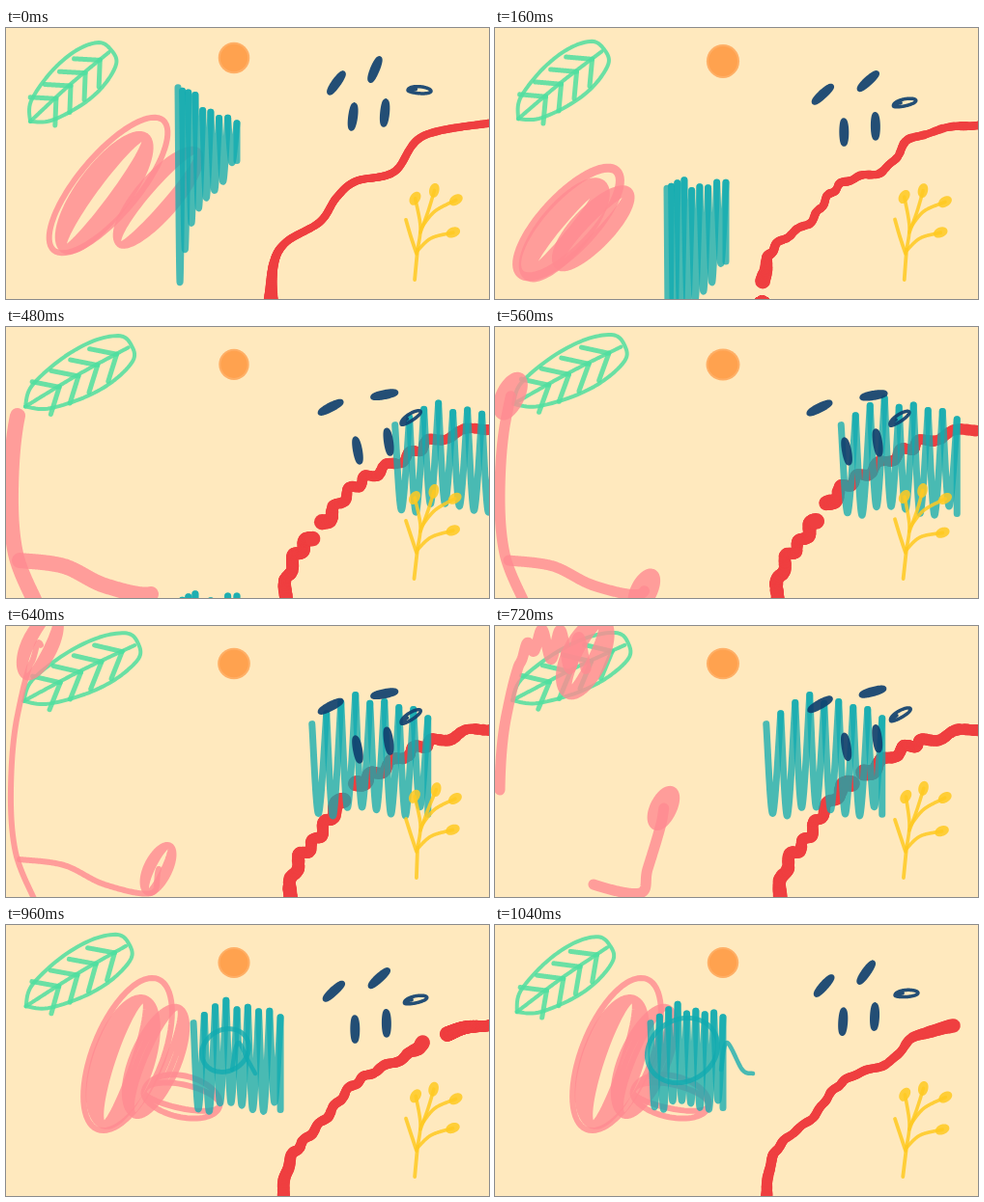
An HTML page with a canvas for the animation above (1.12 s loop, 500 by 281 pixels).

```html
<!DOCTYPE html>
<html lang="en">
<head>
<meta charset="utf-8">
<title>Drifting crayon marks</title>
<style>
  html, body { margin: 0; width: 100%; height: 100%; overflow: hidden; background: #ffe9be; }
  canvas { display: block; width: 100vw; height: 100vh; filter: blur(.5px); }
</style>
</head>
<body>
<canvas id="stage" width="500" height="281"></canvas>
<script>
const ctx = document.getElementById('stage').getContext('2d');
const STEP = 80, STEPS = 14;

const mix = (a, b, t) => a + (b - a) * t;
const clamp = (v, lo = 0, hi = 1) => Math.max(lo, Math.min(hi, v));
const wave = t => Math.sin(Math.PI * t);
const noise = n => {
  const v = Math.sin(n * 12.9898 + 4.1) * 43758.5453;
  return (v - Math.floor(v)) * 2 - 1;
};

function pen(color, alpha) {
  ctx.strokeStyle = ctx.fillStyle = color;
  ctx.globalAlpha = alpha;
}

// Smooth path through the points; the parameter counts points.
function spline(...xy) {
  const last = xy.length / 2 - 1;
  return s => {
    const i = clamp(Math.floor(s), 0, last - 1), t = s - i;
    return [0, 1].map(m => {
      const [a, b, c, d] = [-1, 0, 1, 2].map(k => xy[2 * clamp(i + k, 0, last) + m]);
      return b + t / 2 * (c - a + t * (2 * a - 5 * b + 4 * c - d + t * (3 * (b - c) + d - a)));
    });
  };
}

// A width given as a function makes the stroke swell along its length.
function trace(at, from, to, width, n = 90) {
  if (to <= from) return;
  const swell = typeof width === 'function';
  ctx.beginPath();
  for (let k = 0; k <= n; k++) {
    const s = mix(from, to, k / n), point = at(s);
    ctx.lineWidth = swell ? width(s) : width;
    ctx.lineTo(...point);
    if (swell) {
      ctx.stroke();
      ctx.beginPath();
      ctx.moveTo(...point);
    }
  }
  if (!swell) ctx.stroke();
}

const line = (w, ...xy) => trace(spline(...xy), 0, xy.length / 2 - 1, w);

// Tilted ellipse; extra turns narrow towards the middle like a scribble.
function loop(w, cx, cy, a, b, deg, turns = 1) {
  const r = deg * Math.PI / 180, cos = Math.cos(r), sin = Math.sin(r);
  trace(t => {
    const x = -a * Math.cos(t * 2 * Math.PI);
    const y = -b * Math.sin(t * 2 * Math.PI) * (turns > 1 ? 1 - .7 * t / turns : 1);
    return [cx + x * cos - y * sin, cy + x * sin + y * cos];
  }, 0, turns, w, 70 * Math.ceil(turns));
}

function leaf(sway) {
  const x = mix(25, 18, sway), y = mix(97, 77, sway);
  const dx = mix(109, 138, sway) - x, dy = mix(23, 18, sway) - y;
  const side = 25 / Math.hypot(dx, dy);
  const at = (u, v) => [x + u * dx + v * side * dy, y + u * dy - v * side * dx];
  pen('#50dfa0', .85);
  line(4, ...[0, .13, .45, .75, .96, 1, .95, .72, .45, .15, 0].flatMap((u, i) =>
    at(u, wave(i / 5) * mix(1.05, .9, i / 10))));
  line(4, ...at(0, 0), ...at(.5, .06), ...at(.97, 0));
  for (let u = .32; u < .9; u += .18)
    for (const v of [.75, -.8]) line(5, ...at(u, 0), ...at(u - .17, v));
}

// Two strands leave the lower left corner, over the top and along the bottom.
const OVER = spline(30, 285, 10, 235, 5, 170, 12, 92, 36, 20, 82, 28, 128, 50, 150, 85);
const UNDER = spline(14, 242, 60, 248, 102, 268, 150, 277, 158, 252, 172, 205, 183, 155, 203, 262);

function strand(route, s, zigzag, curl) {
  const head = Math.min(7, 3 + Math.sign(s - 6) * (s - 6) ** 2 / 4), tail = clamp((s - 8) * 2, 0, 6);
  const w = 11 + 5 * Math.cos(Math.PI * (s - 6) / 2);
  trace(u => {
    const [x, y] = route(u);
    return [x, y + zigzag * clamp(u - 3.6) * Math.sin(u * 15.7)];
  }, tail, head, w, 200);
  if (curl > 1) loop(w, ...route(head), curl, curl * .5, -65, 3);
}

function blob(x, y, a, b, deg, w, spread) {
  loop(w, x, y, a, b, deg, 1);
  loop(w * 1.3, x - 4, y + 8, a * .82, b * .85, deg - 4, 5);
  loop(w, x + spread, y + spread * .25, a * .72, b * .75, deg, 3);
}

function scribble(s) {
  pen('#ff8b91', .8);
  if (s < 5) {
    const t = s / 4;
    blob(mix(106, 46, t), mix(163, 240, t), mix(88, 58, t), mix(31, 22, t),
      mix(-50, -44, t), mix(6, 12, t), 52 * (1 - t));
  } else if (s < 12) {
    strand(OVER, s, 18, 42 * wave(clamp((s - 6) / 6)));
    strand(UNDER, s, 0, 27 * wave(clamp((s - 6) / 4)));
  } else {
    blob(126, 134, 84, 36, -68, 6, 30);
    loop(6, 182, 180, 40, 26, 10, 2);
  }
}

function river(s, sway, bump) {
  const rest = [274, 286, 277, 245, 290, 222, 325, 201, 342, 176, 362, 159, 402, 149, 432, 112, 505, 98];
  const bent = [292, 287, 303, 245, 322, 222, 338, 195, 362, 167, 388, 150, 422, 128, 450, 118, 505, 104];
  const path = spline(...rest.map((v, i) => mix(v, bent[i], sway)));
  const gap = mix(-.3, 7.8, (s / 13) ** 1.4);
  const at = u => {
    const [x, y] = path(u), off = 3.5 * bump * Math.sin(u * 9);
    return [x + off * .6, y + off * .8];
  };
  const width = u => 8 + 3 * sway + 6 * Math.exp(-2 * (u - gap) ** 2)
    + 3 * clamp(1 - u / 2) + noise(u * 50) * (.3 + bump);
  pen('#ef3f40', 1);
  trace(at, 0, gap - .28, width, 150);
  trace(at, Math.max(0, gap + .28), 8, width, 200);
}

// Up-and-down hatching between two edges, each a function of 0..1.
function hatch(x, w, top, bottom, power = 1) {
  const n = 9;
  const px = i => x + w * (Math.min(i, n - 1) / (n - 1)) ** power;
  const edge = (f, i, seed) => f(Math.min(i, n - 1) / (n - 1)) + 6 * noise(i + seed);
  for (let i = 0; i < n; i++)
    line(7, px(i), edge(top, i, 3), mix(px(i), px(i + 1), .45), edge(bottom, i, 40),
      px(i + 1), edge(top, i + 1, 3));
}

function block(s) {
  pen('#10abb0', .76);
  const fall = 225 * wave(clamp(s / 13, 0, .5)), taper = clamp(1 - s / 2);
  if (s < 7)
    hatch(178, 61, u => 58 + fall + 43 * u * taper,
      u => mix(261, 134, u ** .6) + fall, 1.25);

  const t = clamp((s - 10) / 3), travel = clamp((s - 4) / 9);
  const x = mix(485, 161, travel) - 25 * wave(travel) ** 2;
  const arch = 24 * wave(travel) + 12 * t;
  if (s > 2)
    hatch(s < 4 ? x + 36 * (4 - s) : x, mix(120, 75, t),
      u => 98 - arch * wave(u), u => 178 + 14 * wave(travel) + 8 * t);
  if (t > .4) {
    loop(5, x + 33, 130, 38 * t, 32 * t, -30);
    line(4.5, 234, 150, 240, 122, mix(240, 256, t), mix(122, 150, t), mix(240, 267, t), 154);
  }
}

// x, y, angle at rest, then their change at mid-loop, then ring or solid.
const DASHES = [
  [342, 57, -55, -6, 27, 28, 0], [382, 43, -68, 10, 28, 58, 0],
  [428, 65, 2, -9, 30, -38, 1], [359, 92, 97, 5, 37, -18, 0], [392, 88, 95, 4, 32, -14, 0]
];

function dashes(bump) {
  pen('#10406f', .92);
  for (const [x, y, deg, dx, dy, turn, ring] of DASHES)
    loop(ring ? 3.5 : 5.5, x + dx * bump, y + dy * bump, 12, ring ? 5 : 2.5, deg + turn * bump, ring ? 1.2 : 3);
}

function sprig(s) {
  const jitter = i => 1.5 * noise(s * 7 + i);
  const tips = [[424, 176, -60], [444, 169, -80], [465, 179, -35], [462, 212, -25]]
    .map(([x, y, deg], i) => [x + jitter(i), y + jitter(i + 9), deg]);
  const forks = [[426, 230, 429, 206], [429, 212, 437, 190], [430, 207, 444, 190], [425, 232, 440, 218]];
  pen('#ffca22', .86);
  line(3.8, 423.5 + jitter(5), 261, 426, 230);
  line(3.8, 414, 200 + jitter(6), 419, 216, 425, 234);
  tips.forEach(([x, y, deg], i) => {
    line(3.6, ...forks[i], x, y);
    loop(5, x, y, 5, 3.2, deg, 2);
  });
}

function sun(s) {
  const y = 31 + 8 * wave(clamp(s / 14, 0, .5));
  pen('#ff9d48', .75);
  for (const r of [16.5, 14.5]) {
    ctx.beginPath();
    ctx.ellipse(236, y, r + noise(s), r + noise(s + 5), 0, 0, 7);
    ctx.fill();
  }
}

function draw(s) {
  const u = s / STEPS, bump = wave(u), sway = wave(u ** 1.6);
  pen('#ffe9be', 1);
  ctx.fillRect(0, 0, 500, 281);
  ctx.lineCap = ctx.lineJoin = 'round';
  leaf(sway);
  scribble(s);
  river(s, sway, bump);
  block(s);
  dashes(bump);
  sprig(s);
  sun(s);
}

let shown = -1;
function tick() {
  const step = Math.floor(performance.now() / STEP) % STEPS;
  if (step !== shown) draw(shown = step);
  requestAnimationFrame(tick);
}
tick();
</script>
</body>
</html>
```
